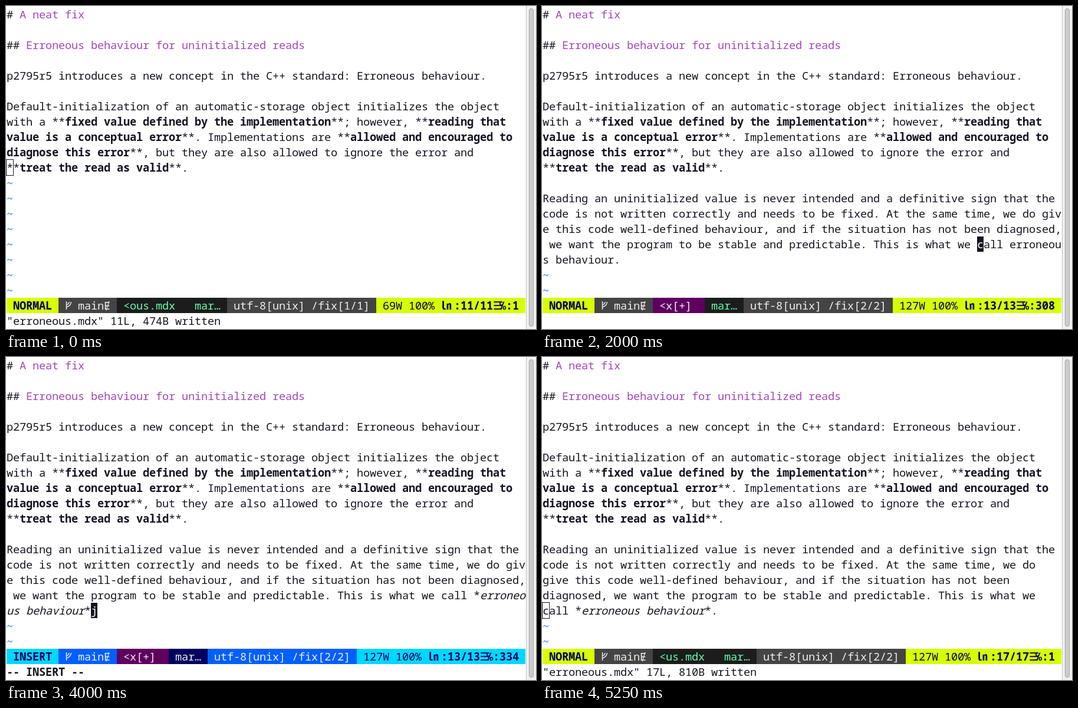
These frames come from a looping animation (899 px wide and 548 px high, 5500 ms). An HTML page:

```html
<!DOCTYPE html>
<html lang="en">
<head>
<meta charset="utf-8">
<title>Editor session</title>
<style>
  html, body { margin: 0; width: 100%; height: 100%; overflow: hidden; background: #fff; }
  svg { display: block; width: 899px; height: 548px; }
  text { font: 18.667px "Noto Sans Mono", "DejaVu Sans Mono", monospace; white-space: pre; }
  .b { font-weight: 700; }
  .i { font-style: italic; }
  .cjk { font-family: "Noto Sans CJK JP", "Noto Sans CJK", "Noto Sans Mono CJK JP", sans-serif; }
  .sym { font-family: "DejaVu Sans", sans-serif; }
</style>
</head>
<body>
<svg viewBox="0 0 899 548">
  <path d="M882 0H891Q899 0 899 8V540Q899 548 891 548H882Z" fill="#f1f1f1"/>
  <path d="M882.5 0V548" stroke="#bfbfbf"/>
  <rect x="887.5" y="4.5" width="7" height="539" rx="3.5" fill="#cdcdcd" stroke="#a3a3a3"/>
  <g id="screen"></g>
</svg>
<script>
const CELL = 11, LINE = 26, COLS = 80, STEP = 250, LOOP = 5500;
const INK = '#171421', TITLE = '#a347ba', TILDE = '#2a7bde', NAVY = '#00005f';
const PURPLE = '#5f005f', PALE = '#eeeeee';
const screen = document.getElementById('screen');

const intro = [
  '# A neat fix', '',
  '## Erroneous behaviour for uninitialized reads', '',
  'p2795r5 introduces a new concept in the C++ standard: Erroneous behaviour.', '',
  'Default-initialization of an automatic-storage object initializes the object',
  'with a **fixed value defined by the implementation**; however, **reading that',
  'value is a conceptual error**. Implementations are **allowed and encouraged to',
  'diagnose this error**, but they are also allowed to ignore the error and',
  '**treat the read as valid**.'
];
const lead = 'Reading an uninitialized value is never intended and a definitive sign that the ' +
  'code is not written correctly and needs to be fixed. At the same time, we do give ' +
  'this code well-defined behaviour, and if the situation has not been diagnosed, ' +
  'we want the program to be stable and predictable. This is what we call ';
const term = 'erroneous behaviour';
const chop = s => s.match(/.{1,80}/g);
const wrap = s => s.match(/.{1,79}(?= |$)/g).map(l => l.trimStart());

const docs = {
  start: [],
  open: [''],
  blank: ['', ''],
  plain: ['', ...chop(lead + term + '.')],
  star: ['', ...chop(lead + '*' + term + '.')],
  typing: ['', ...chop(lead + '*' + term + '*j')],
  closed: ['', ...chop(lead + '*' + term + '*.')],
  flowed: ['', ...wrap(lead + '*' + term + '*.')]
};

const modes = {
  NORMAL: { a: '#d7ff00', b: '#444444', c: '#1c1c1c', ink: '#5fffaf' },
  INSERT: { a: '#00d7ff', b: '#005fff', c: NAVY, ink: PALE },
  COMMAND: { a: '#00d700', b: '#444444', c: '#1c1c1c', ink: '#5fffaf' }
};

const N = 'NORMAL', I = 'INSERT', INS = '-- INSERT --';
const saved = n => `"erroneous.mdx" ${n} written`;
// mode, document, cursor row, cursor column, message, cursor outlined
const steps = [
  [N, 'start', 10, 0, saved('11L, 474B'), true],
  [N, 'start', 10, 0, saved('11L, 474B')],
  [I, 'open', 11, 0, INS],
  [I, 'blank', 12, 0, INS],
  [I, 'plain', 16, 12, INS],
  [I, 'plain', 16, 12, INS],
  [N, 'plain', 16, 11, ''],
  [N, 'plain', 16, 2, ''],
  [N, 'plain', 15, 67, ''],
  [N, 'plain', 15, 72, ''],
  [I, 'plain', 15, 72, INS],
  [I, 'star', 15, 73, INS],
  [N, 'star', 15, 72, ''],
  [N, 'star', 16, 3, ''],
  [N, 'star', 16, 12, ''],
  [I, 'star', 16, 12, INS],
  [I, 'typing', 16, 13, INS],
  [N, 'closed', 16, 12, ''],
  [N, 'flowed', 16, 0, '4 more lines'],
  ['COMMAND', 'flowed', 16, 0, ':w'],
  [N, 'flowed', 16, 0, saved('17L, 810B')],
  [N, 'flowed', 16, 0, saved('17L, 810B'), true]
];

const X = c => 1 + c * CELL;
const Y = r => 1 + r * LINE;
const esc = s => s.replace(/&/g, '&amp;').replace(/</g, '&lt;');

function put(s, r, c, fill = INK, cls = '') {
  if (!s.trim()) return '';
  const xs = [...s].map((_, i) => X(c + i)).join(' ');
  return `<text x="${xs}" y="${Y(r) + 20}" fill="${fill}" class="${cls}">${esc(s)}</text>`;
}

const bar = (r, c, n, fill) =>
  `<rect x="${X(c)}" y="${Y(r)}" width="${n * CELL}" height="${LINE}" fill="${fill}"/>`;

// Emphasis may run on over several lines, so its state is kept between them.
function prose(lines, top, italics) {
  let out = '', bold = false, slant = false;
  lines.forEach((line, k) => {
    let c = 0;
    for (const part of line.match(/\*+|[^*]+/g) || []) {
      const mark = part[0] === '*';
      out += put(part, top + k, c, INK, mark ? '' : bold ? 'b' : slant ? 'i' : '');
      if (part === '**') bold = !bold;
      else if (mark && italics) slant = !slant;
      c += part.length;
    }
  });
  return out;
}

function heading(r) {
  const n = intro[r].indexOf(' ');
  return put(intro[r].slice(0, n), r, 0) + put(intro[r].slice(n), r, n, TITLE);
}

function branch(c, fill) {
  const x = X(c) + 2.5, y = Y(19);
  return `<path d="M${x} ${y + 6}v14M${x} ${y + 12}q4 -1 4.5 -5M${x} ${y + 16}q7 -2 8 -9"` +
    ` fill="none" stroke="${fill}" stroke-width="1.5"/>`;
}

function status(mode, doc, ln, total, pos) {
  const m = modes[mode], r = 19;
  const long = docs[doc].length > 2, dirty = doc !== 'start' && !status.clean;
  const count = long ? ' 127W 100% ' : ' 69W 100% ';
  const place = `:${ln}/${total}`, tail = `:${pos} `;
  const info = ` utf-8[unix] /fix[${long ? '2/2' : '1/1'}] `;
  const wa = mode.length + 2;
  const right = COLS - count.length - 2 - place.length - 2 - tail.length;
  const mid = right - info.length, file = wa + 9;
  const room = mid - file - 9;
  const name = '<' + ('erroneous.mdx' + (dirty ? '[+]' : '')).slice(1 - room);
  const hot = dirty && mode !== 'COMMAND';
  const p = right + count.length, q = p + 2 + place.length;
  return bar(r, 0, wa, m.a) + put(` ${mode} `, r, 0, NAVY, 'b') +
    bar(r, wa, 9, m.b) + branch(wa + 1, PALE) + put('main\u0246', r, wa + 3, PALE) +
    bar(r, file, mid - file, m.c) +
    (hot ? bar(r, file, room + 3, PURPLE) : '') +
    put(name, r, file + 1, hot ? PALE : m.ink) +
    put('mar\u2026', r, mid - 5, m.ink) +
    bar(r, mid, info.length, m.b) + put(info, r, mid, PALE) +
    bar(r, right, COLS - right, m.a) + put(count, r, right, NAVY) +
    put('\u33d1', r, p, NAVY, 'b cjk') + put(place, r, p + 2, NAVY, 'b') +
    put('\u2630', r, q, NAVY, 'b sym') + put('\u2105' + tail, r, q + 1, NAVY, 'b');
}

function cursor(r, c, ch, outlined) {
  if (outlined)
    return `<rect x="${X(c) - .5}" y="${Y(r) - .5}" width="12" height="27" fill="none" stroke="${INK}"/>`;
  return bar(r, c, 1, INK) + put(ch, r, c, '#fff');
}

function render(n) {
  const [mode, doc, row, col, msg, outlined] = steps[n];
  const lines = [...intro, ...docs[doc]];
  const oneLine = docs[doc].length > 2 && doc !== 'flowed';
  const ln = oneLine ? 13 : row + 1;
  const total = oneLine ? 13 : lines.length;
  const pos = oneLine ? (row - 12) * COLS + col + 1 : col + 1;
  status.clean = msg.endsWith('written');

  let out = heading(0) + heading(2) + put(intro[4], 4, 0) + prose(intro.slice(6), 6, false) +
    prose(docs[doc], 11, doc !== 'star');
  for (let r = lines.length; r < 19; r++) out += put('~', r, 0, TILDE);
  out += status(mode, doc, ln, total, pos) + put(msg, 20, 0, INK, mode === I ? 'b' : '');
  out += mode === 'COMMAND' ? cursor(20, msg.length, ' ')
    : cursor(row, col, lines[row][col] || ' ', outlined);
  screen.innerHTML = out;
}

let shown = -1;
const began = performance.now();
function tick() {
  const n = Math.floor((performance.now() - began) % LOOP / STEP);
  if (n !== shown) render(shown = n);
  requestAnimationFrame(tick);
}
tick();
</script>
</body>
</html>
```
